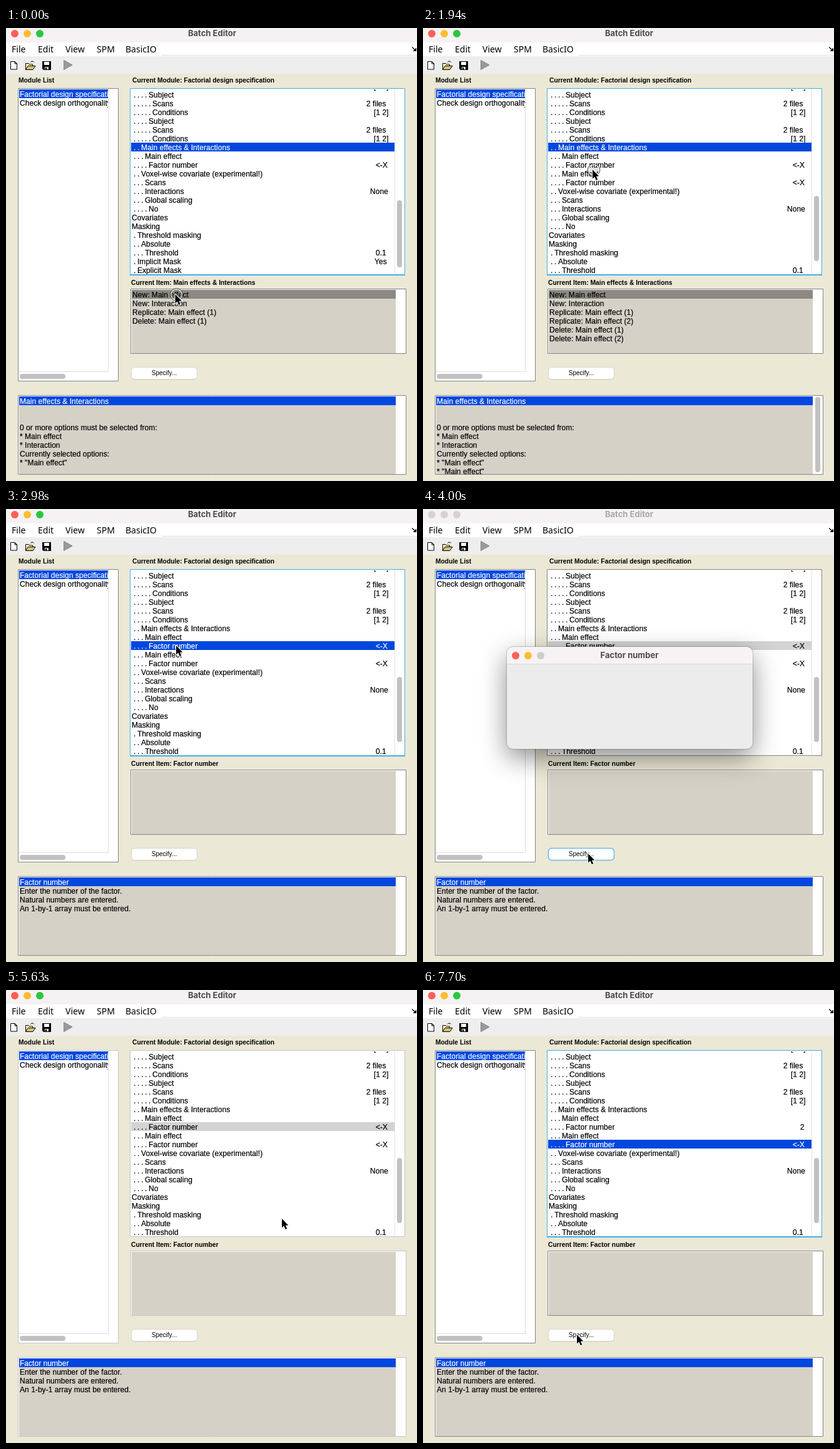
An HTML page with a canvas that plays this animation: 657x723 px, repeating every 8000 ms.

```html
<!DOCTYPE html>
<html lang="en">
<head>
<meta charset="utf-8">
<title>Batch Editor</title>
<style>
html, body { margin: 0; width: 657px; height: 723px; overflow: hidden; background: #ebe8d6; }
canvas { display: block; }
</style>
</head>
<body>
<canvas id="stage" width="657" height="723"></canvas>
<script>
const g = document.getElementById('stage').getContext('2d');
const LOOP = 8000, TICKS = 54;
const SANS = '"Liberation Sans", Arial, sans-serif';
const BODY = '12px ' + SANS, LABEL = 'bold 10.3px ' + SANS, SMALL = '10px ' + SANS;
const TITLE = '700 13px Inter, sans-serif', MENU = '500 14px "Noto Sans", sans-serif';
const BLUE = '#0047df', FOCUS = '#45adea', BEIGE = '#d5d1c7', THUMB = '#c1c1c1';
let edge;

// Rows: depth, name | value
const subject = ['4 Subject', '5 Scans|2 files', '5 Conditions|[1 2]'];
const effect = value => ['3 Main effect', '4 Factor number|' + value];
const tail = ['2 Voxel-wise covariate (experimental!)', '3 Scans', '3 Interactions|None',
  '3 Global scaling', '4 No', '0 Covariates', '0 Masking', '1 Threshold masking', '2 Absolute',
  '3 Threshold|0.1', '1 Implicit Mask|Yes', '1 Explicit Mask'];
const valueX = { '2 files': 576, '[1 2]': 588, '<-X': 591, None: 582, '0.1': 591, Yes: 589, 2: 603 };

const helpTexts = {
  6: ['Main effects & Interactions', '', '', '0 or more options must be selected from:',
    '* Main effect', '* Interaction', 'Currently selected options:', '* "Main effect"'],
  9: ['Main effect', 'Add a main effect to your design matrix.', '',
    'This branch contains 1 items:', '* Factor number'],
  8: ['Factor number', 'Enter the number of the factor.', 'Natural numbers are entered.',
    'An 1-by-1 array must be entered.']
};

// Cursor path: tick, x, y
const path = [[0, 270.5, 425], [8, 270.5, 424], [13, 271, 226], [15, 271, 226], [16, 270, 221],
  [17, 270, 218], [19, 271, 218], [20, 272, 218], [24, 264, 550], [33, 264, 550], [37, 441, 365],
  [41, 441, 365], [44, 573, 244], [48, 573, 244], [52, 246, 550]];
const clicks = [0, 13, 19, 26, 37, 45];

const between = (n, a, b) => n >= a && n < b;

function rect(x, y, w, h, fill) {
  g.fillStyle = fill;
  g.fillRect(x, y, w, h);
}

function text(s, x, y, font = BODY, color = '#000', align = 'left') {
  g.font = font;
  g.fillStyle = g.strokeStyle = color;
  g.textAlign = align;
  g.letterSpacing = font === BODY ? '0.04px' : '0px';
  g.fillText(s, x, y);
  // Slightly heavier strokes for the list text
  if (font === BODY) {
    g.lineWidth = .2;
    g.strokeText(s, x, y);
  }
}

function shape(draw, fill, stroke, width = 1) {
  g.beginPath();
  draw();
  if (fill) { g.fillStyle = fill; g.fill(); }
  if (stroke) { g.strokeStyle = stroke; g.lineWidth = width; g.stroke(); }
}

const poly = (...p) => () => {
  for (let i = 0; i < p.length; i += 2) g.lineTo(p[i], p[i + 1]);
  g.closePath();
};
const circle = (x, y, r) => () => g.arc(x, y, r, 0, 7);
const round = (x, y, w, h, r) => () => g.roundRect(x, y, w, h, r);

function box(x, y, w, h, color = edge) {
  rect(x, y, w, h, '#fff');
  shape(() => g.rect(x + .5, y + .5, w - 1, h - 1), null, color);
}

function clipped(x, y, w, h, draw) {
  g.save();
  g.beginPath();
  g.rect(x, y, w, h);
  g.clip();
  draw();
  g.restore();
}

function lights(x, y, colors) {
  colors.forEach((color, i) => shape(circle(x + 20 * i, y, 6), color));
}

function toolbar() {
  shape(poly(7.5, 53.5, 14, 53.5, 17.5, 57, 17.5, 66, 7.5, 66), '#fff', '#000');
  shape(poly(14, 53.5, 14, 57, 17.5, 57), null, '#000');
  shape(poly(31.5, 66, 31.5, 56.5, 36, 56.5, 37, 58, 42.5, 58, 42.5, 66), '#fff8c8', '#000');
  shape(poly(31.5, 66.5, 35, 60.5, 47, 60.5, 43, 66.5), '#d8c070', '#000');
  shape(() => g.arc(42, 56, 3, 3.6, 5.8), null, '#000');
  shape(poly(58, 53, 72, 53, 72, 67, 60, 67, 58, 65), '#000');
  rect(61, 54, 8, 5, '#fff');
  rect(62, 62, 6, 4, '#ddd');
  rect(63, 63, 2, 3, '#000');
  shape(poly(92.5, 51.5, 106, 59, 92.5, 66.5), '#9a9a9a', '#858585');
}

function frameParts(active) {
  rect(0, 0, 657, 723, '#ebe8d6');
  rect(0, 0, 657, 23, '#f6f2f3');
  rect(0, 23, 657, 22, '#fff');
  rect(0, 45, 657, 28, '#eee');
  rect(249, 43, 408, 1, '#dedede');
  const gray = '#d5d2d2';
  lights(14, 9, active ? ['#ff5f57', '#febc2e', '#28c840'] : [gray, gray, gray]);
  text('Batch Editor', 329.5, 13, TITLE, active ? '#4b494a' : '#aaa7a8', 'center');
  [['File', 9], ['Edit', 51], ['View', 95], ['SPM', 145], ['BasicIO', 191]]
    .forEach(([s, x]) => text(s, x, 39, MENU));
  shape(() => { g.moveTo(649, 30.5); g.lineTo(654, 35); }, null, '#000', 1.3);
  shape(poly(656, 31.5, 656, 37, 650.5, 37), '#000');
  toolbar();
}

function moduleList() {
  text('Module List', 20, 87, LABEL);
  box(19, 96, 161, 468);
  rect(163, 97, 1, 452, '#dcdcdc');
  rect(20, 548, 144, 1, '#dcdcdc');
  shape(round(22, 552, 73, 8, 4), THUMB);
  clipped(21, 97, 142, 450, () => {
    rect(21, 98, 142, 14, BLUE);
    text('Factorial design specification', 22, 110, BODY, '#fff');
    text('Check design orthogonality', 22, 124);
  });
}

function moduleTree(n, selected, focused) {
  const grown = n >= 7;
  const rows = [subject[2], ...subject, ...subject, '2 Main effects & Interactions',
    ...effect(n >= 40 ? '2' : '<-X'), ...(grown ? effect('<-X') : []), ...tail];
  text('Current Module: Factorial design specification', 202, 87, LABEL);
  box(198, 96, 440, 298, focused ? FOCUS : edge);
  if (focused) rect(198, 393, 440, 2, FOCUS);
  rect(621, 97, 1, 296, '#e2e2e2');
  shape(grown ? round(625, 268, 8, 104, 4) : round(625, 275, 8, 107, 4), THUMB);
  clipped(200, 98, 421, 295, () => rows.forEach((row, i) => {
    const top = 85 + 14 * i, hit = i - 1 === selected;
    const color = hit && focused ? '#fff' : '#000';
    const [name, value] = row.slice(2).split('|'), depth = +row[0];
    if (hit) rect(200, top, 421, 14, focused ? BLUE : '#d3d3d3');
    for (let d = 0; d < depth; d++) text('.', 204 + 6 * d, top + 12, BODY, color);
    text(name, depth ? 204 + 6 * depth : 201, top + 12, BODY, color);
    if (value) text(value, valueX[value], top + 12, BODY, color);
  }));
}

function currentItem(n, selected, itemFocus, buttonFocus) {
  const options = selected === 6;
  text('Current Item: ' + (options ? 'Main effects & Interactions' : 'Factor number'), 200, 410, LABEL);
  box(199, 416, 441, 104, itemFocus ? FOCUS : edge);
  rect(201, 418, 422, 101, BEIGE);
  if (options) {
    rect(201, 418, 422, 14, '#8b8982');
    const ids = n >= 7 ? [1, 2] : [1];
    const each = verb => ids.map(i => `${verb}: Main effect (${i})`);
    ['New: Main effect', 'New: Interaction', ...each('Replicate'), ...each('Delete')]
      .forEach((s, i) => text(s, 202, 430 + 14 * i));
  }
  shape(round(200.5, 542.5, 105, 19, 5), '#d2cfc0');
  shape(round(200.5, 541.5, 105, 19, 5), '#fff', buttonFocus ? '#76b7ea' : '#d9d6c8', buttonFocus ? 1.6 : 1);
  text('Specify...', 253, 554, SMALL, '#000', 'center');
}

function helpBox(n, selected) {
  const lines = [...helpTexts[selected === 10 ? 8 : selected]];
  const long = selected === 6 && n >= 7;
  if (long) lines.push('* "Main effect"');
  box(19, 586, 621, 127);
  rect(21, 588, 602, 124, BEIGE);
  rect(21, 588, 602, 14, BLUE);
  if (long) shape(round(627, 589, 8, 120, 4), THUMB);
  clipped(21, 587, 602, 125, () =>
    lines.forEach((s, i) => text(s, 22, 600 + 14 * i, BODY, i ? '#000' : '#fff')));
}

function dialog(n) {
  g.save();
  g.shadowColor = 'rgba(0,0,0,.45)';
  g.shadowBlur = 42;
  g.shadowOffsetY = 14;
  shape(round(134, 220, 393, 163, 10), '#ececec');
  g.restore();
  shape(round(134, 220, 393, 28, [10, 10, 0, 0]), '#f7f3f4');
  rect(134, 247, 393, 1, '#dcd9da');
  shape(round(133.5, 219.5, 394, 164, 10), null, 'rgba(0,0,0,.18)');
  lights(148, 234, ['#ff5f57', '#febc2e', '#d0cdce']);
  text('Factor number', 330, 238, TITLE, '#4b494a', 'center');
  if (n < 28) return;
  box(142, 310, 377, 34, FOCUS);
  if (n >= 31) text('2', 146, 324);
  [['OK', 438], ['Cancel', 493]].forEach(([s, x]) => {
    shape(round(x - 25.5, 354.5, 51, 19, 5), '#fff', '#d0d0d0');
    text(s, x, 368, SMALL, '#000', 'center');
  });
}

function pointer(n) {
  let i = 0;
  while (i < path.length - 2 && path[i + 1][0] <= n) i++;
  const [a, x0, y0] = path[i], [b, x1, y1] = path[i + 1];
  const p = Math.min(1, (n - a) / (b - a)), e = p * p * (3 - 2 * p);
  const x = x0 + (x1 - x0) * e, y = y0 + (y1 - y0) * e;
  if (clicks.includes(n)) {
    shape(circle(x + 2, y + .5, 8.8), 'rgba(120,120,120,.2)', '#fff', 1.4);
    shape(circle(x + 2, y + .5, 9.8), null, '#333');
  }
  g.save();
  g.translate(x, y);
  const arrow = poly(0, 0, 0, 14.5, 3.3, 11.6, 5.8, 17, 8.3, 16, 5.9, 10.7, 10.3, 10.5);
  g.lineJoin = 'round';
  shape(arrow, '#000', '#fff', 2);
  shape(arrow, '#000');
  g.restore();
}

function draw(n) {
  const selected = n < 14 ? 6 : n < 20 ? 9 : n < 46 ? 8 : 10;
  const open = between(n, 27, 38), busy = between(n, 38, 40);
  const itemFocus = between(n, 3, 7);
  edge = busy ? '#c6c6c6' : '#858585';
  frameParts(!open);
  moduleList();
  moduleTree(n, selected, !itemFocus && !between(n, 26, 46));
  if (selected !== 9) currentItem(n, selected, itemFocus, between(n, 26, 46) && !busy);
  helpBox(n, selected);
  if (open) dialog(n);
  pointer(n);
}

function loop() {
  const t = performance.now() % LOOP;
  draw(Math.min(TICKS - 1, Math.floor(t * TICKS / LOOP + .1)));
  requestAnimationFrame(loop);
}
loop();
</script>
</body>
</html>
```
